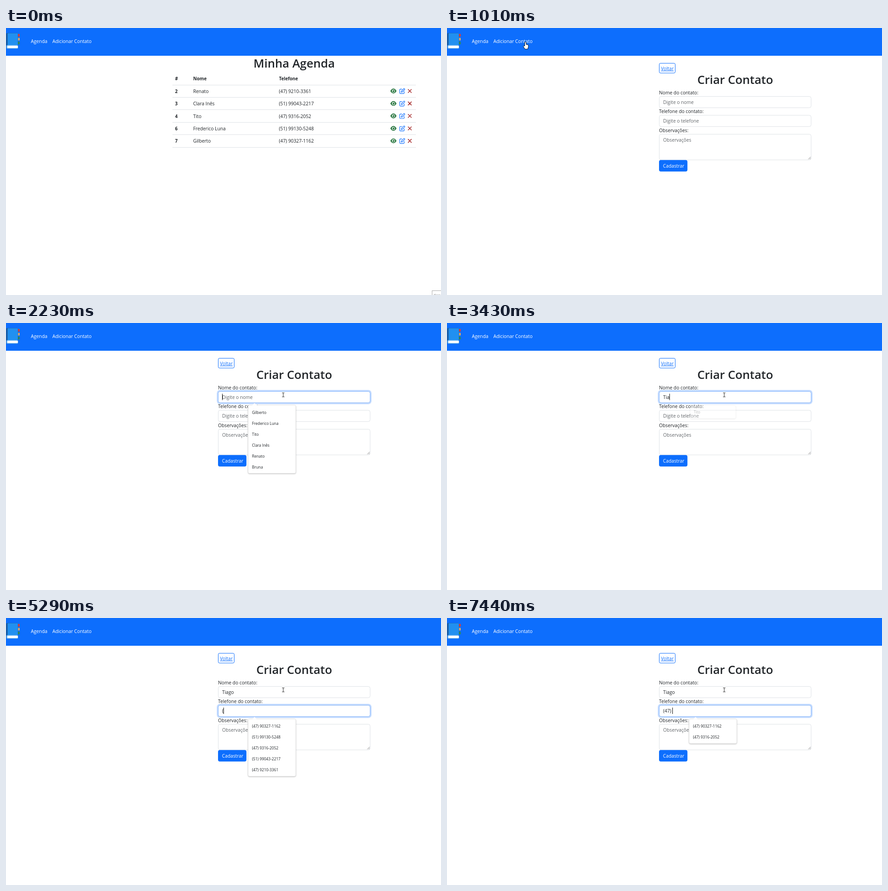
Animation, 954 px wide and 587 px high, one loop 7990 ms. Source, as an HTML page:

```html
<!DOCTYPE html>
<html lang="pt-BR">
<head>
<meta charset="utf-8">
<title>Minha Agenda</title>
<style>
  html, body { margin: 0; height: 100%; overflow: hidden; background: #fff; }
  svg { display: block; width: 100vw; height: 100vh; }
  text { font: 10.25px "Open Sans", "Noto Sans", sans-serif; fill: #212529; white-space: pre; }
  .bold { font-size: 9.8px; font-weight: 700; }
  .title { font-size: 25.7px; font-weight: 600; text-anchor: middle; }
  .hint { fill: #63676b; }
  .light { fill: #fff; }
  .link { fill: #0d6efd; font-size: 10.1px; text-decoration: underline; }
  .option { font-size: 8.4px; }
  .box { fill: #fff; stroke: #dee2e6; }
  .ring { fill: none; stroke: #0d6efd; stroke-opacity: .25; stroke-width: 2.7; }
  .edge { fill: none; stroke: #86b7fe; }
  .menu { fill: #fff; stroke: #ddd; stroke-width: .7; filter: drop-shadow(0 1px 1px rgba(0,0,0,.25)); }
</style>
</head>
<body>
<svg id="stage" viewBox="0 0 954 587">
  <defs>
    <g id="tools">
      <path d="M843 0Q846-5.2 849.7-5.2T856.4 0Q853.4 5.2 849.7 5.2T843 0" fill="#176b30"/>
      <circle cx="849.7" r="3.5" fill="#fff"/>
      <circle cx="849.7" r="2.4" fill="#176b30"/>
      <circle cx="848.8" cy="-.9" r="1" fill="#fff"/>
      <g fill="none" stroke="#0d6efd" stroke-width="1.2" stroke-linejoin="round" stroke-linecap="round">
        <path d="M868-4.2H865Q863.5-4.2 863.5-2.7V4.2Q863.5 5.7 865 5.7H871.8Q873.3 5.7 873.3 4.2V1.2"/>
        <path d="M866.8 2.6L867.4 0L872.3-5Q873.2-5.7 874.1-4.9T874.3-3L869.4 2Z"/>
      </g>
      <path d="M882-3.5L889 3.5M889-3.5L882 3.5" stroke="#a52a2a" stroke-width="1.5" stroke-linecap="round"/>
    </g>
  </defs>

  <rect width="954" height="61" fill="#0d6efd"/>
  <g id="book">
    <rect x="25" y="13" width="5" height="6" rx="1" fill="#e53935"/>
    <rect x="25" y="21.5" width="5" height="6" rx="1" fill="#e8a860"/>
    <rect x="25" y="30" width="5" height="6" rx="1" fill="#2e8b57"/>
    <rect x=".5" y="11" width="26" height="34.5" rx="2.5" fill="#1a5a9a"/>
    <rect x="3.5" y="11.5" width="22.5" height="26.5" rx="1" fill="#2190f0"/>
    <rect x="1" y="37.5" width="25.5" height="8" rx="2.5" fill="#74b9f5"/>
    <rect x="3" y="39" width="23" height="5" rx="1.5" fill="#fff"/>
  </g>
  <text class="light" x="54.5" y="32.8">Agenda</text>
  <text class="light" x="101.7" y="32.8">Adicionar Contato</text>

  <g id="list"></g>

  <g id="form">
    <rect x="465.5" y="77.5" width="35" height="21.5" rx="2.7" fill="#fff" stroke="#0d6efd"/>
    <text class="link" x="469.3" y="92.8">Voltar</text>
    <text class="title" x="632" y="123.4">Criar Contato</text>
    <text x="465" y="146">Nome do contato:</text>
    <text x="465" y="187.4">Telefone do contato:</text>
    <text x="465" y="228.8">Observações:</text>
    <rect class="box" x="465.5" y="233.5" width="333" height="56.5" rx="4"/>
    <text class="hint" x="474" y="249.6">Observações</text>
    <path d="M792.5 288.5L797.5 283.5M795.5 288.5L797.5 286.5" stroke="#666" stroke-width=".8"/>
    <rect x="465" y="290.3" width="62.3" height="25.3" rx="4" fill="#0d6efd"/>
    <text class="light" x="473.8" y="306.7">Cadastrar</text>
    <g id="fields"></g>
    <g id="menu"></g>
  </g>

  <g id="tip">
    <rect x="934.5" y="577.5" width="30" height="20" fill="#fff" stroke="#aaa"/>
    <text class="hint" x="938" y="590" style="font-size:8px">Gravar</text>
  </g>

  <g id="cursor" stroke-linejoin="round">
    <path id="arrow" d="M0 0V15.5L3.6 12.2L6 17.5L8.3 16.5L6 11.3H11Z" fill="#fff" stroke="#000" stroke-width=".8"/>
    <path id="hand" d="M-1.5 8.5V1Q-1.5-.5 0-.5T1.5 1V5L5 5.7Q6.5 6 6.4 7.8V10.5L5 15.3H-1L-4.3 10.2Q-4.8 8.3-3.2 8Z" fill="#fff" stroke="#000" stroke-width=".9"/>
    <path id="beam" d="M-2.5-4.5H-.7L0-4L.7-4.5H2.5M0-4V4M-2.5 4.5H-.7L0 4L.7 4.5H2.5" fill="none" stroke="#222"/>
  </g>
</svg>
<script>
const LOOP = 7990, ROW = 27.4;
const $ = id => document.getElementById(id);
const clamp = v => Math.max(0, Math.min(1, v));
const show = (el, on) => el.style.display = on ? "" : "none";
const label = (x, y, str, cls = "") => `<text class="${cls}" x="${x}" y="${y}">${str}</text>`;

const people = [
  [2, "Renato", "(47) 9210-3361"],
  [3, "Clara Inês", "(51) 99043-2217"],
  [4, "Tito", "(47) 9316-2052"],
  [6, "Frederico Luna", "(51) 99130-5248"],
  [7, "Gilberto", "(47) 90327-1162"]
];
const phones = people.map(p => p[2]).reverse();
const names = people.map(p => p[1]).reverse().concat("Bruna");

const rule = i => `<rect x="365" y="${Math.floor(125 + ROW * i)}" width="534" height="1" fill="#dee2e6"/>`;
$("list").innerHTML = label(632, 87.4, "Minha Agenda", "title") +
  label(370.7, 115.4, "#", "bold") + label(410.5, 115.4, "Nome", "bold") +
  label(598.7, 115.4, "Telefone", "bold") + rule(0) +
  people.map(([id, name, phone], i) => {
    const y = 142.8 + ROW * i;
    return label(370.7, y, id, "bold") + label(410.5, y, name) + label(598.5, y, phone) +
      `<use href="#tools" y="${y - 4.3}"/>` + rule(i + 1);
  }).join("");

// keys: [time, text, caret index]
const fields = [
  { y: 150.5, hint: "Digite o nome", from: 2090, to: 3970, keys: [
    [2090, "", 0], [2630, "T", 1], [3030, "Ti", 2], [3300, "Tia", 3], [3570, "Tiag", 4], [3710, "Tiago", 5]] },
  { y: 191.9, hint: "Digite o telefone", from: 3970, to: LOOP + 200, keys: [
    [3970, "", 0], [5230, "(", 1], [5370, "()", 2], [5770, "()", 1],
    [6370, "(4)", 2], [6640, "(47)", 3], [7300, "(47)", 4], [7440, "(47)\u00a0", 5]] }
];
for (const f of fields) {
  const rect = (cls, grow, rx) => `<rect class="${cls}" x="${465.5 - grow}" y="${f.y - grow}"
    width="${333 + 2 * grow}" height="${24.8 + 2 * grow}" rx="${rx}"/>`;
  const g = document.createElementNS("http://www.w3.org/2000/svg", "g");
  g.innerHTML = rect("box", 0, 4) + `<g>${rect("ring", 1.8, 5.5)}${rect("edge", 0, 4)}</g>` +
    label(474, f.y + 16.3, "") + `<rect y="${f.y + 5}" width="1" height="14" fill="#000"/>`;
  $("fields").append(g);
  [, f.glow, f.text, f.caret] = g.children;
}

// Suggestion lists: [open, start of close, end, top, options]
const menus = [
  [2090, 2630, 2630, 180.6, names],
  [2630, 3300, 3490, 180.6, ["Tito"]],
  [5230, 5370, 5500, 222, phones],
  [7440, LOOP, LOOP, 222, [phones[0], phones[2]]]
];

// Pointer stops: [time, x, y]
const path = [
  [0, 990, 610], [67, 820, 500], [134, 540, 330], [201, 310, 205], [268, 213, 150], [402, 213, 150],
  [536, 184, 80], [670, 161, 21], [804, 165, 29], [938, 165, 29], [1005, 172, 31], [1072, 220, 45],
  [1139, 314, 72], [1273, 465, 122], [1407, 612, 170], [1474, 624, 175], [1675, 608, 158], [LOOP, 608, 158]
];

function drawField(f, t) {
  const key = f.keys.filter(k => k[0] <= t).pop() || [0, "", 0];
  const [at, str, pos] = key;
  f.text.textContent = str || f.hint;
  f.text.setAttribute("class", str ? "" : "hint");
  f.glow.style.opacity = clamp((t - f.from + 30) / 150) - clamp((t - f.to + 30) / 150);
  f.caret.setAttribute("x", 474 + (pos ? f.text.getSubStringLength(0, pos) - .3 : 0));
  show(f.caret, t >= f.from && t < f.to && (t - at) % 1060 < 530);
}

let openMenu;
function drawMenu(t) {
  const menu = menus.find(m => t >= m[0] && t < m[2]);
  show($("menu"), menu);
  if (!menu) return;
  const [, close, end, top, options] = menu;
  const height = options.length * 24 + 6;
  if (menu !== openMenu) {
    $("menu").innerHTML = `<rect class="menu" x="531" y="${top}" width="104.5" height="${height}" rx="3"/>
      <path d="M540 ${top + .5}L545 ${top - 4.5}L550 ${top + .5}" fill="#fff" stroke="#eee" stroke-width=".5"/>` +
      options.map((o, i) => label(539.5, top + 19 + 24 * i, o, "option")).join("");
    openMenu = menu;
  }
  const out = end > close ? clamp((t - close) / (end - close)) : 0;
  const cy = top + height / 2;
  $("menu").style.opacity = 1 - out;
  $("menu").setAttribute("transform", `translate(583 ${cy}) scale(${1 - .06 * out}) translate(-583 ${-cy})`);
}

function drawCursor(t) {
  const now = t - t % 67;
  const i = Math.max(1, path.findIndex(p => p[0] > now));
  const [t0, x0, y0] = path[i - 1], [t1, x1, y1] = path[i];
  const k = (now - t0) / (t1 - t0);
  const x = x0 + (x1 - x0) * k, y = y0 + (y1 - y0) * k;
  const hand = x > 100 && x < 188 && y > 16 && y < 43;
  const beam = t > 1010 && x > 465 && x < 799 && y > 150 && y < 176;
  $("cursor").setAttribute("transform", `translate(${x} ${y})`);
  show($("hand"), hand);
  show($("beam"), beam);
  show($("arrow"), !hand && !beam);
}

function draw(t) {
  const onForm = t >= 1010;
  show($("list"), !onForm);
  show($("form"), onForm);
  $("tip").style.opacity = 1 - clamp((t - 60) / 150);
  if (onForm) {
    fields.forEach(f => drawField(f, t));
    drawMenu(t);
  }
  drawCursor(t);
}

const start = performance.now();
(function tick() {
  draw((performance.now() - start) % LOOP);
  requestAnimationFrame(tick);
})();
</script>
</body>
</html>
```
